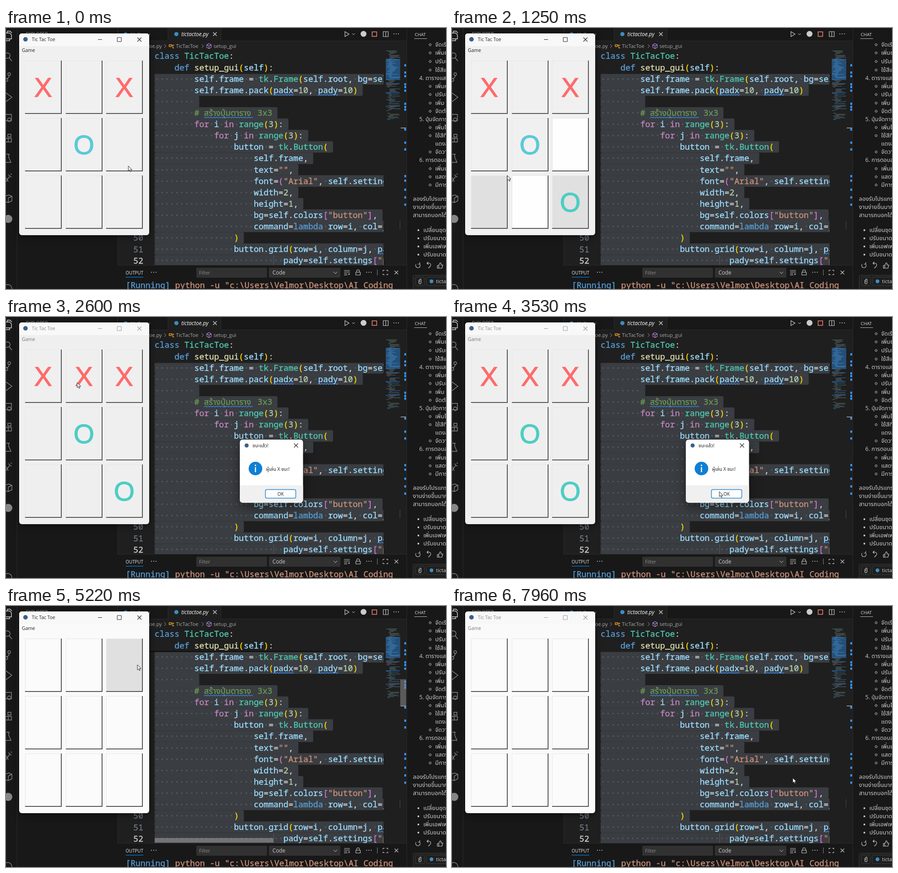
Recreate the animation shown at these times as an HTML page. Size 971 px wide and 577 px high, loop 8 s.

```html
<!DOCTYPE html>
<html lang="th">
<head>
<meta charset="utf-8">
<title>Tic Tac Toe</title>
<style>
html, body { margin: 0; width: 100%; height: 100%; overflow: hidden; background: #181818; }
svg { display: block; position: absolute; left: 0; top: 0; }
text { font-family: "Open Sans", "Noto Sans", "Noto Sans Thai", sans-serif; white-space: pre; }
.mono { font-family: "Noto Sans Mono", "Noto Sans Thai", "DejaVu Sans Mono", monospace; font-size: 18.23px; stroke-width: .4px; }
.mark { font-family: "Liberation Sans", Arial, sans-serif; font-size: 59px; text-anchor: middle; stroke-width: 1.3px; }
#dialog { filter: drop-shadow(0 8px 12px rgba(0,0,0,.5)); }
#win { filter: drop-shadow(0 3px 7px rgba(0,0,0,.5)); }
</style>
</head>
<body>
<svg id="stage" width="971" height="577" viewBox="0 0 971 577"></svg>
<script>
const CW = 10.938, LEFT = 328, LINE = 25.11, RIGHT = 833;
const stage = document.getElementById('stage');

const rect = (x, y, w, h, fill, more = '') =>
  `<rect x="${x}" y="${y}" width="${w}" height="${h}" fill="${fill}" ${more}/>`;
const path = (d, stroke = '#ccc', w = 1, more = '') =>
  `<path d="${d}" fill="none" stroke="${stroke}" stroke-width="${w}" ${more}/>`;
const disc = (x, y, r, fill, more = '') =>
  `<circle cx="${x}" cy="${y}" r="${r}" fill="${fill}" ${more}/>`;
const ring = (x, y, r, stroke, w = 1) =>
  disc(x, y, r, 'none', `stroke="${stroke}" stroke-width="${w}"`);
const text = (x, mid, s, size, fill, more = '') =>
  `<text x="${x}" y="${mid + size * .36}" font-size="${size}" fill="${fill}" ${more}>${s}</text>`;
const mono = (x, mid, s, fill) =>
  `<text class="mono" x="${x}" y="${mid + 6.4}" fill="${fill}" stroke="${fill}">${s}</text>`;
const span = (s, fill) => `<tspan fill="${fill}" stroke="${fill}">${s}</tspan>`;
const cross = (x, y, r, color, w = 1.1, more = '') =>
  path(`M${x - r} ${y - r}l${2 * r} ${2 * r}m0 ${-2 * r}l${-2 * r} ${2 * r}`, color, w, more);
const chevron = (x, y, more = '') => path(`M${x - 2} ${y - 4}l4 4l-4 4`, '#999', 1, more);
const down = (x, y, r = 4) => path(`M${x - r} ${y - r / 2}l${r} ${r}l${r} ${-r}`);
const dots = (x, y) => [-5, 0, 5].map(d => disc(x + d, y, 1, '#ccc')).join('');
const wave = (x, y, end) => {
  let d = `M${x} ${y}`;
  for (let i = 0; x + i * 3 < end; i++) d += `l3 ${i % 2 ? 2.4 : -2.4}`;
  return path(d, '#3794ff', 1.1);
};

let seed = 7;
const rnd = () => (seed = seed * 16807 % 2147483647) / 2147483647;

// Code view
const lines = [
  [0, 'class TicTacToe:'],
  [4, 'def setup_gui(self):'],
  [8, 'self.frame = tk.Frame(self.root, bg=self.colors["bg"])'],
  [8, 'self.frame.pack(padx=10, pady=10)'],
  [8, ''],
  [8, '# '],
  [8, 'for i in range(3):'],
  [12, 'for j in range(3):'],
  [16, 'button = tk.Button('],
  [20, 'self.frame,'],
  [20, 'text="",'],
  [20, 'font=("Arial", self.settings["size"]),'],
  [20, 'width=2,'],
  [20, 'height=1,'],
  [20, 'bg=self.colors["button"],'],
  [20, 'command=lambda row=i, col=j: self.play(row, col)'],
  [16, ')'],
  [16, 'button.grid(row=i, column=j, padx=self.settings["pad"],'],
  [26, 'pady=self.settings["pad"])'],
];
const token = /(#.*)|("[^"]*")|\b(for|in)\b|\b(class|def|lambda)\b|\b(TicTacToe|tk|Frame|Button|range)\b|\b(setup_gui)\b|(\d+)|(\w+)|([()\[\]])|( +)|(.)/g;
const tints = ['#6a9955', '#ce9178', '#c586c0', '#569cd6', '#4ec9b0', '#dcdcaa', '#b5cea8', '#9cdcfe', '', '#606469', '#d4d4d4'];
let depth = 0;

function paint(code, selected) {
  return code.replace(token, (s, ...g) => {
    const kind = g.slice(0, 11).findIndex(v => v !== undefined);
    let fill = tints[kind];
    if (kind === 8) {
      if (')]'.includes(s)) depth--;
      fill = depth % 2 ? '#da70d6' : '#ffd700';
      if ('(['.includes(s)) depth++;
    }
    if (kind === 9 && selected) s = '·'.repeat(s.length);
    return span(s, fill);
  });
}

function codeView() {
  let back = '', front = '';
  lines.forEach(([indent, code], i) => {
    const mid = 62 + i * LINE, selected = i > 1;
    if (selected) {
      const end = i === 5 ? 599 : Math.min(RIGHT + 6, LEFT + (indent + code.length + 1) * CW);
      back += rect(LEFT, mid - 12.6, end - LEFT, LINE + .2, '#3a3d41', 'rx="3"');
    }
    front += mono(LEFT, mid, paint(' '.repeat(indent) + code, selected), '#d4d4d4');
  });
  front += mono(437, 187.5, 'สร้างปุ่มตาราง', '#6a9955') + mono(555, 187.5, '3x3', '#6a9955');
  front += wave(590, 149, 633) + wave(688, 149, 732) + wave(437, 199, 545) + wave(820, 500, 834);
  front += path('M590.5 502V524', '#5a5a5a');
  return `<clipPath id="code"><rect x="246" y="50" width="${RIGHT - 246}" height="474"/></clipPath>
    <g clip-path="url(#code)">${back}${rect(246, 50, 588, 51.5, '#1f1f1f')}${front}</g>` +
    [50, 51, 52].map((n, i) => mono(281, 464 + i * LINE, n, n === 52 ? '#cccccc' : '#6e7681')).join('');
}

function minimap() {
  let s = rect(838, 68, 32, 47, '#264f78');
  for (let y = 50; y < 203; y += 2) {
    const picked = y > 67 && y < 115;
    const x = 839 + Math.floor(rnd() * 4) * 2.5, w = 4 + rnd() * 22;
    const color = picked ? '#3f7fb5' : ['#55697a', '#4a6f68', '#6b5a4d', '#2f5f8c'][Math.floor(rnd() * 4)];
    if (rnd() > .12) s += rect(x, y, Math.min(w, 870 - x), 1, color);
  }
  s += rect(838, 122, 31, 2, '#264f78') + rect(838, 142, 31, 2, '#264f78') + rect(838, 172, 31, 2, '#264f78');
  [80, 96, 104, 122, 128, 136, 165, 172, 178, 222, 251, 266, 325, 335, 355, 372, 388]
    .forEach(y => s += rect(879, y, 4, 5, '#3794ff'));
  return s + rect(871, 220, 12, 2, '#8a8a8a') + rect(869, 427, 1, 18, '#4a4a4a');
}

function activityBar() {
  const c = '#868686';
  return path('M24.5 0V577', '#2b2b2b') +
    path('M-2 11H8l4 4V24H-2M3 11V7H9l4 4M-2 28H8V24', '#d7d7d7', 1.4) +
    ring(3, 61, 6, c, 1.4) + path('M7 66l6 7', c, 1.5) +
    ring(7, 102, 3, c, 1.4) + ring(1, 115, 3, c, 1.4) + path('M7 105q0 6-6 7', c, 1.4) +
    path('M-1 143L13 153L0 163', c, 1.4) +
    path('M-2 191H12V205H-2', c, 1.4) + ring(7, 203, 4, c, 1.3) +
    path('M-2 244H12V252H-2M5 244V252M4 235H11V241H4Z', c, 1.4) +
    path('M1 279H8M6 279V286L11 297H-2', c, 1.4) +
    path('M-1 341L8 328M5 324l7 6M10 322l3 2M1 331l4 9', c, 1.4) +
    path('M-2 372L6 369L13 372V382L5 386L-2 384M5 376V386M13 372L5 376', c, 1.4) +
    disc(5, 422, 9, c) + ring(4, 576, 9, c, 1.4);
}

function tabs() {
  return rect(246, 0, 638, 28, '#181818') + path('M246 28.5H884M246.5 0V577', '#2b2b2b') +
    text(44, 13, 'EXPLORER', 10, '#aaaaaa') +
    disc(264, 14, 4.5, '#3c7fb0') + text(276, 14, 'Hello.py', 11.2, '#9d9d9d') +
    rect(357, 0, 118, 29, '#1f1f1f') + path('M357.5 0V28M474.5 0V28', '#2b2b2b') +
    disc(376, 13.5, 4.6, '#3c8dbc') + text(387, 14, 'tictactoe.py', 11.9, '#ffffff', 'font-style="italic"') +
    cross(461, 13.5, 4, '#ddd') +
    path('M748 8V19L757 13.5Z', '#ccc', 1.2) + down(767, 13.5, 3) + disc(789, 13, 6.5, '#cccccc') +
    path('M808 8.5H818V18.5H808Z', '#f48771', 1.5) +
    path('M832.5 8H843.5V19H832.5ZM838 8V19', '#ccc', 1.2) + dots(861, 13) +
    text(344, 40, 'tictactoe.py', 11.2, '#a9a9a9', 'text-anchor="end"') + chevron(351, 40) +
    path('M360 37h5v4h-5zM365 38h6M368 38v6h3', '#ee9d28', 1.3) +
    text(375, 40, 'TicTacToe', 11.2, '#a9a9a9') + chevron(434, 40) +
    path('M448 34.5l5 2.7v5.6l-5 2.7l-5-2.7v-5.6zM443 37.2l5 2.8l5-2.8M448 40v5.5', '#b180d7', 1.1) +
    text(458, 40, 'setup_gui', 11.2, '#a9a9a9');
}

function panel() {
  return rect(246, 524, 638, 53, '#181818') + path('M246 524.5H884', '#2b2b2b') +
    text(264, 541, 'OUTPUT', 9.9, '#e7e7e7') + rect(264, 550, 39, 1.4, '#0078d4') + dots(326, 540) +
    rect(420, 530, 156, 22, '#313131', 'rx="2"') + text(426, 541, 'Filter', 10.5, '#8a8a8a') +
    rect(580, 530, 158, 22, '#313131', 'rx="2"') + text(588, 541, 'Code', 11.8, '#cccccc') + down(727, 541) +
    path('M746 536H759M746 539.5H759M746 543H753M746 546H753M755 542l4 4m0-4l-4 4') +
    path('M772 540H782V546H772ZM774 540v-2.5a3 3 0 0 1 6 0V540', '#ccc', 1.1) + dots(801, 540) +
    path('M819.5 534V547', '#888') +
    path('M832 538V535.5H835.5M839 535.5H842.5V538M842.5 543V545.5H839M835.5 545.5H832V543', '#ccc', 1.2) +
    cross(861.5, 540.5, 4, '#ccc') +
    mono(264, 569, '[Running] ' + span('python -u "c:\\Users\\Velmor\\Desktop\\AI Coding', '#ce9178'), '#569cd6');
}

function chat() {
  const ink = '#cccccc', size = 13;
  let s = rect(884, 0, 87, 577, '#181818') + path('M884.5 0V577', '#2b2b2b') +
    text(902, 14, 'CHAT', 9.8, '#e0e0e0') + rect(901, 23, 28, 1, '#bbbbbb');
  const steps = [
    [36, 'จัดเรียง'], [54, 'เพิ่มขนาด'], [73, 'ปรับเส้น'], [92, 'ใช้สีเข้ม'],
    [128, 'เพิ่มการ'], [146, 'ปรับขนาด'], [165, 'เพิ่ม ปุ่ม'], [183, 'จัดตำแหน่ง'],
    [219, 'เพิ่มไอคอน'], [237, 'ใช้สีที่'], [273, 'จัดวาง'],
    [310, 'เพิ่มเอฟ'], [328, 'แสดงผล'], [346, 'มีการแจ้ง'],
  ];
  steps.forEach(([y, t]) => s += ring(936, y + 1, 2.3, ink) + text(947, y, t, size, ink));
  s += text(947, 255, 'แดงสด', size, ink);
  [[110, '4. ตารางแสดงผล'], [201, '5. ปุ่มจัดการเกม'], [291, '6. การตอบสนอง']]
    .forEach(([y, t]) => s += text(912, y, t, 12.5, ink));
  [[377, 'ลองรับโปรแกรมดู'], [395, 'งานง่ายขึ้นมากขึ้น'], [413, 'สามารถบอกได้เลย']]
    .forEach(([y, t]) => s += text(898, y, t, size, ink));
  [[446, 'เปลี่ยนชุดสี'], [464, 'ปรับขนาดช่อง'], [482, 'เพิ่มเอฟเฟกต์'], [500, 'ปรับขนาดฟอนต์']]
    .forEach(([y, t]) => s += disc(910, y + 1, 2, ink) + text(921, y, t, size, ink));
  return s + path('M905 522a5 5 0 1 0 8 0M913 518v4h-4', ink, 1.2) +
    path('M929 520h5a4 4 0 0 1 2 7l-4 4M932 517l-3 3l3 3', ink, 1.2) +
    path('M952 525h3l3-6q3 0 2 5h4l-2 7h-10zM955 525v6', ink, 1.2) +
    rect(898.5, 546.5, 90, 50, '#1f1f1f', 'stroke="#3c3c3c" rx="3"') +
    rect(903.5, 550.5, 20, 19, 'none', 'stroke="#3c3c3c" rx="3"') +
    path('M911 557v6a2.5 2.5 0 0 0 5 0v-7a1.7 1.7 0 0 0-3 0v6', ink, 1.1) +
    rect(927.5, 550.5, 60, 19, 'none', 'stroke="#3c3c3c" rx="3"') +
    disc(939, 560, 4.2, '#3c8dbc') + text(949, 560, 'tictactoe.py', 11, ink);
}

function gameWindow() {
  let cells = '';
  for (let i = 0; i < 9; i++) {
    const x = Math.round(42 + i % 3 * 89.7), y = 72 + Math.floor(i / 3) * 127;
    cells += rect(x, y, 80, 118, '#f0f0f0', 'class="cell"') +
      path(`M${x + .5} ${y + 117}V${y + .5}H${x + 79}`, '#e6e6e6') +
      path(`M${x} ${y + 117}H${x + 80}V${y}`, '#565656', 2) +
      `<text class="mark" x="${x + 40}" y="${y + 80}"></text>`;
  }
  return `<g id="win">${rect(29, 12, 287, 446, '#f0f0f0', 'id="body" rx="6"')}
    <path d="M29 40V18a6 6 0 0 1 6-6H310a6 6 0 0 1 6 6V40Z" fill="#f8f8f8"/>
    ${disc(43, 25, 5, '#3d5f86')}
    ${text(57, 25.5, 'Tic Tac Toe', 10.4, '#222', 'class="head"')}
    ${text(35, 49, 'Game', 10.5, '#222', 'id="menu"')}
    <g id="ctl" stroke="#222">${path('M203 25.5H212', 'inherit', 1)}${path('M245.5 21H254.5V30H245.5Z', 'inherit', 1)}
    ${cross(294.5, 25.5, 4.5, 'inherit')}</g>${cells}</g>`;
}

function dialog() {
  return `<g id="dialog">${rect(516, 271, 139.5, 139.5, '#ffffff', 'rx="6"')}
    <path d="M516 372H655.5V404.5a6 6 0 0 1-6 6H522a6 6 0 0 1-6-6Z" fill="#f0f0f0"/>
    ${disc(531, 284, 4.5, '#3d5f86')}${text(544, 284.5, 'ชนะแล้ว!', 10.4, '#222')}${cross(640, 284, 4.5, '#222')}
    ${disc(550.5, 335, 15, '#0f7fd4')}${rect(549.3, 332, 2.4, 11, '#fff')}${disc(550.5, 328, 1.7, '#fff')}
    ${text(574, 336, 'ผู้เล่น X ชนะ!', 10.4, '#222')}
    ${rect(572.5, 381.5, 67, 19, '#fdfdfd', 'id="ok" rx="3" stroke="#2f86c8" stroke-width="1.5"')}
    ${text(606, 391.5, 'OK', 10, '#222', 'text-anchor="middle"')}</g>`;
}

stage.innerHTML = rect(0, 0, 971, 577, '#181818') + rect(246, 28, 638, 496, '#1f1f1f') +
  activityBar() + tabs() + codeView() + minimap() +
  `<g id="bars">${rect(870, 162, 13, 60, '#8a8a8a', 'opacity=".55"')}${rect(328, 513, 262, 10, '#9a9a9a', 'opacity=".6"')}${rect(246, 99.5, 588, 2, '#0c0c0c')}</g>` +
  panel() + chat() + gameWindow() + dialog() +
  `<g id="cursor"><path id="arrow" d="M0 0V11.2L2.6 8.8L4.4 12.8L6.2 12L4.5 8.2H8Z" fill="#fff" stroke="#111" stroke-width=".9"/>
   <path id="beam" d="M-2 -5H2M0 -5V6M-2 6H2" fill="none" stroke="#222" stroke-width="1.2"/></g>`;

// Timing: [first step, last step, count]
const runs = [[0, 0, 1], [150, 1130, 8], [1250, 2180, 8], [2330, 3260, 8], [3390, 3810, 4],
  [4370, 4520, 2], [4830, 5760, 8], [5880, 6720, 7], [6970, 7960, 9]];
const ticks = runs.flatMap(([a, b, n]) =>
  Array.from({ length: n }, (_, i) => Math.round(a + (b - a) * i / Math.max(1, n - 1))));

// Pointer: [time, x, y]
const route = [[0, 270, 305], [150, 272, 314], [290, 270, 336], [430, 264, 362], [570, 260, 372], [710, 252, 370],
  [850, 207, 350], [1130, 122, 326], [1250, 122, 326], [1383, 100, 288], [1649, 76, 172], [1781, 100, 145],
  [1914, 148, 158], [2047, 154, 218], [2180, 156, 172], [2330, 157, 145], [2600, 157, 145], [2861, 268, 196],
  [3260, 480, 325], [3530, 590, 386], [3810, 615, 391], [4520, 615, 392], [4830, 570, 340], [5096, 290, 130],
  [5229, 214, 93], [5361, 170, 50], [5494, 310, 62], [5760, 905, 330], [6020, 917, 470], [6160, 900, 538],
  [6440, 850, 470], [6720, 800, 400], [7300, 760, 385], [7960, 752, 380]];

// Cell fills: [time, cells, colour]
const GREY = '#e0e0e0', WHITE = '#fefefe', SOFT = '#fbfbfb', ALL = '012345678';
const fills = [[0, ALL, '#f0f0f0'], [150, '5', GREY], [290, '5', WHITE], [290, '8', GREY], [850, '7', GREY],
  [1130, '7', WHITE], [1250, '6', GREY], [1383, '6', WHITE], [1383, '3', GREY], [1649, '3', WHITE], [1649, '0', GREY],
  [1914, '1', GREY], [2040, '1', WHITE], [2040, '4', GREY], [2180, '1', GREY], [2460, ALL, '#efefef'],
  [4370, ALL, SOFT], [4370, '01248', '#e2e2e2'], [4520, ALL, SOFT], [5090, '2', GREY], [5361, '2', SOFT]];

// Moves: [time, cell, mark]
const moves = [[0, 0, 'X'], [0, 2, 'X'], [0, 4, 'O'], [570, 8, 'O'], [2330, 1, 'X']];

const $ = id => document.getElementById(id);
const set = (node, name, value) => node.setAttribute(name, value);
const cells = [...document.querySelectorAll('.cell')], marks = [...document.querySelectorAll('.mark')];
const head = document.querySelector('.head');
const within = (t, a, b) => t >= a && t < b;

function pointer(t) {
  const i = Math.max(1, route.findIndex(k => k[0] >= t));
  const [a, b] = [route[i - 1], route[i]];
  const p = (t - a[0]) / (b[0] - a[0]);
  return [a[1] + (b[1] - a[1]) * p, a[2] + (b[2] - a[2]) * p];
}

function draw(now) {
  let t = 0;
  for (const k of ticks) if (k <= now) t = k;

  const color = [];
  for (const [at, list, c] of fills) if (t >= at) for (const i of list) color[i] = c;
  cells.forEach((c, i) => set(c, 'fill', color[i]));

  const board = Array(9).fill('');
  if (t < 4520) for (const [at, i, m] of moves) if (t >= at) board[i] = m;
  marks.forEach((m, i) => {
    const ink = board[i] === 'X' ? '#ff6b6b' : i === 4 && t < 2040 ? '#5cc9d8' : '#4ecdc4';
    m.textContent = board[i];
    set(m, 'fill', ink);
    set(m, 'stroke', ink);
  });

  const idle = within(t, 2460, 4520) || t >= 7200;
  set(head, 'fill', idle ? '#8b8b8b' : '#222');
  set($('ctl'), 'stroke', idle ? '#9a9a9a' : '#222');
  set($('menu'), 'fill', within(t, 2460, 4370) || t >= 7200 ? '#777' : '#222');
  set($('body'), 'fill', t >= 4370 ? '#fafafa' : t >= 2460 ? '#efefef' : '#f0f0f0');

  const shown = within(t, 2460, 4520);
  $('dialog').style.display = shown ? '' : 'none';
  set($('dialog'), 'opacity', t < 2590 ? .6 : t >= 4370 ? .86 : 1);
  set($('ok'), 'fill', t >= 4370 ? '#c9dff0' : t >= 3660 ? '#e0eef9' : '#fdfdfd');

  const bars = within(t, 3000, 3500) || within(t, 4500, 5500) ? 1
    : within(t, 5500, 6100) ? (6100 - t) / 600 : 0;
  set($('bars'), 'opacity', bars);

  const [x, y] = pointer(t), beam = within(t, 4370, 4830);
  set($('cursor'), 'transform', `translate(${x.toFixed(1)} ${y.toFixed(1)})`);
  $('beam').style.display = beam ? '' : 'none';
  $('arrow').style.display = beam ? 'none' : '';
}

const start = performance.now();
function loop() {
  draw((performance.now() - start) % 8000);
  requestAnimationFrame(loop);
}
loop();
</script>
</body>
</html>
```
